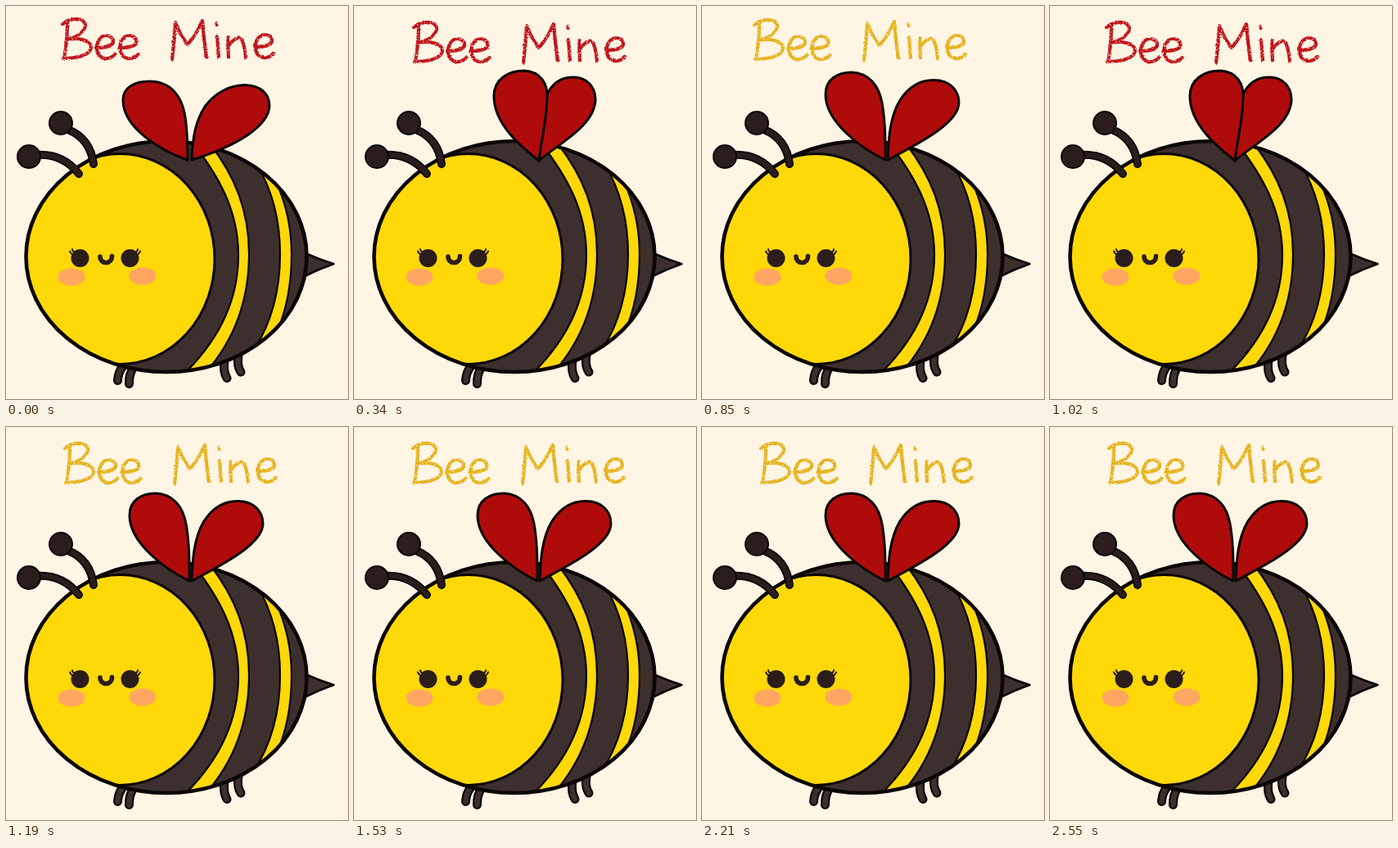
Animation of 418x480 px, one loop 2.72 s. Source, as an HTML page without scripts:

```html
<!DOCTYPE html>
<html lang="en">
<head>
<meta charset="utf-8">
<title>Bee Mine</title>
<style>
  html, body { margin: 0; width: 100%; height: 100%; overflow: hidden; background: #fff5e4; }
  svg { display: block; width: 100%; height: 100%; }
  .ink { stroke: #0b0606; stroke-linejoin: round; stroke-linecap: round; }
  .dark { fill: #3d2f2d; }
  .sun { fill: #ffd807; }
  .feeler { fill: #2b1d1b; }
  .line { fill: none; stroke-linecap: round; stroke-linejoin: round; }
  .wings path { fill: #b00b0b; stroke-width: 3; }

  /* Wings flap open, half, closed, half */
  .open, .half, .shut { opacity: 0; animation: open .68s step-end infinite; }
  .half { animation: half .34s step-end infinite; }
  .shut { animation-name: shut; }
  @keyframes open { 0% { opacity: 1 } 25%, 100% { opacity: 0 } }
  @keyframes half { 0% { opacity: 0 } 50%, 100% { opacity: 1 } }
  @keyframes shut { 0% { opacity: 0 } 50% { opacity: 1 } 75%, 100% { opacity: 0 } }

  .title { animation: jump 2.72s step-end infinite; }
  .title g { stroke: #c0161b; stroke-width: 4.2; animation: tint .34s step-end infinite; }
  @keyframes tint { 0% { stroke: #c0161b } 50%, 100% { stroke: #e6b422 } }
  @keyframes jump {
    0%, 50%, 75% { transform: translate(0, 0) }
    6.25% { transform: translate(-5px, 2px) }
    12.5% { transform: translate(4px, 4px) }
    18.75% { transform: translate(2.5px, -1px) }
    25% { transform: translate(-2px, -2px) }
    31.25% { transform: translate(-5px, 1px) }
    37.5%, 62.5%, 87.5% { transform: translate(0, 4px) }
    43.75%, 56.25%, 68.75%, 81.25%, 93.75%, 100% { transform: translate(3px, 4px) }
  }
</style>
</head>
<body>
<svg viewBox="0 0 418 480" role="img" aria-label="Bee Mine">
  <defs>
    <filter id="crayon" filterUnits="userSpaceOnUse" x="50" y="0" width="300" height="85">
      <feTurbulence type="fractalNoise" baseFrequency=".45" numOctaves="2" seed="4" result="grain"/>
      <feDisplacementMap in="SourceGraphic" in2="grain" scale="2.600" xChannelSelector="R" yChannelSelector="G" result="rough"/>
      <feColorMatrix in="grain" values="0 0 0 0 0  0 0 0 0 0  0 0 0 0 0  0 0 0 7 -1.700" result="gaps"/>
      <feComposite in="rough" in2="gaps" operator="in"/>
    </filter>
    <ellipse id="body" cx="196" cy="306" rx="171.500" ry="141"/>
    <clipPath id="trunk"><use href="#body"/></clipPath>
    <path id="legs" d="M143 440Q137 447 136.500 457.500M156 441Q150 450 150.500 461.500M267 433Q265 446 270 454.500M284 426Q282 440 287 447"/>
    <path id="stalks" d="M76 151Q103 162 107 193M38 182Q69 180 89 205"/>
    <path id="e" d="M0 15C10 15 20 13 21 8C21 2 16 0 12 0C5 0 0 9 1 17C2 26 9 29 14 28Q20 27 23 23"/>
  </defs>

  <g class="title">
    <g class="line" filter="url(#crayon)">
      <path d="M75 20Q75 42 71 64M69 22C78 14 97 13 97 24C96 32 86 38 75 41C90 38 104 42 104 51C103 60 86 64 70 64"/>
      <use href="#e" x="110" y="36"/>
      <use href="#e" x="138.500" y="36"/>
      <path d="M203 65Q206 42 207 20Q213 36 222 47Q232 36 240 18Q242 42 245 63"/>
      <path d="M258 37L260 62M257 21L257.500 23"/>
      <path d="M271 38L272 63M272 49C278 39 287 36 289 43Q292 51 293 63"/>
      <use href="#e" x="304" y="35"/>
    </g>
  </g>

  <use href="#legs" class="line" stroke="#0b0606" stroke-width="11"/>
  <use href="#legs" class="line" stroke="#3d2f2d" stroke-width="6.500"/>
  <path class="ink dark" stroke-width="2.600" d="M366 302Q384 310 400.500 315Q383 321 365 330Z"/>

  <use href="#body" class="dark"/>
  <g class="ink sun" clip-path="url(#trunk)" stroke-width="2.200">
    <path d="M229 168C260 208 284 250 284 304C284 365 256 412 217 450L240 452C279 410 297 360 297 303C297 250 280 208 249 168Z"/>
    <path d="M307 194C327 228 335 265 335 303C335 345 325 386 303 420L330 400C343 372 349 340 349 303C349 268 342 240 329 212Z"/>
    <ellipse stroke-width="3" cx="139.500" cy="309" rx="115.500" ry="128.500"/>
  </g>
  <use href="#body" class="ink" fill="none" stroke-width="4.600"/>

  <use href="#stalks" class="line" stroke="#0b0606" stroke-width="10"/>
  <use href="#stalks" class="line" stroke="#2b1d1b" stroke-width="6.500"/>
  <g class="ink feeler" stroke-width="2">
    <circle cx="67" cy="143" r="14"/>
    <circle cx="28" cy="184" r="14"/>
  </g>

  <g fill="#ffa662">
    <ellipse cx="80" cy="331" rx="16.500" ry="10.500"/>
    <ellipse cx="167" cy="330" rx="16.500" ry="10.500"/>
  </g>
  <g class="feeler">
    <circle cx="90.500" cy="308" r="11"/>
    <circle cx="151.500" cy="308" r="11"/>
  </g>
  <g class="line" stroke="#2b1d1b" stroke-width="2">
    <path d="M83 304Q79 303 78 299.500M85 301Q81 300 81 297M159 304Q163 303 164 299.500M157 301Q161 300 161 297"/>
    <path stroke-width="5.600" d="M115 306C115 316 129.500 316 129.500 305.500"/>
  </g>

  <g class="wings ink">
    <g class="open">
      <path d="M222 188C192 178 143 150 143 115C143 100 156 92 175 92C203 92 214 112 218 130C222 150 222 170 222 188Z"/>
      <path d="M227 188C228 160 232 140 243 123C256 105 275 96.500 292 96.500C312 97 322 108 322 122C321 146 285 170 227 188Z"/>
    </g>
    <g class="half">
      <path d="M224 188C195 174 151 142 151 108C151 90 165 81 183 81C205 82 216 98 220 118C225 145 224 170 224 188Z"/>
      <path d="M227 188C228 160 230 135 242 115C253 98 268 90.500 283 90.500C304 90.500 314 104 314 118C314 143 265 168 227 188Z"/>
    </g>
    <g class="shut">
      <path d="M226 189C228 165 235 145 236 108C243 93 255 87 268 87C286 87 295 100 295 114C295 146 250 168 226 189Z"/>
      <path d="M226 189C205 172 171 145 171 110C171 90 188 79 208 79C228 80 237 95 236 112C235 145 228 165 226 189Z"/>
    </g>
  </g>
</svg>
</body>
</html>
```
